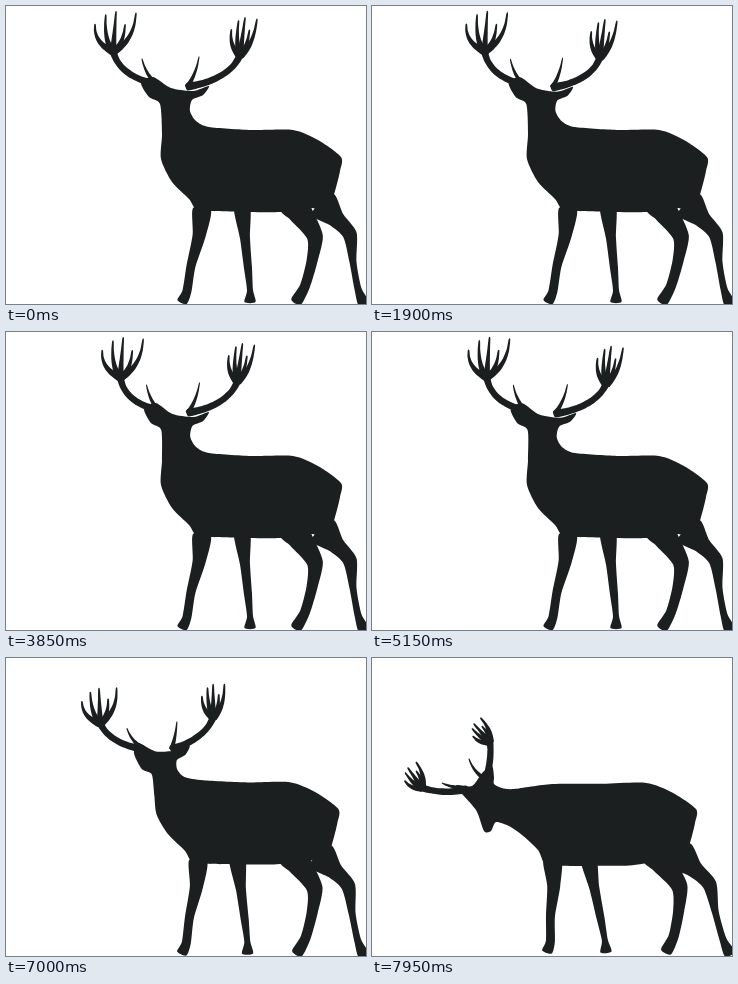
Recreate the animation shown at these times as an HTML page with a canvas. Size 360 by 298 pixels, loop 8 s.

```html
<!DOCTYPE html>
<html lang="en">
<head>
<meta charset="utf-8">
<title>Stag</title>
<style>
  html, body { margin: 0; width: 100%; height: 100%; overflow: hidden; background: #fff; }
  canvas { display: block; }
</style>
</head>
<body>
<canvas id="stage" width="360" height="298"></canvas>
<script>
const ctx = document.getElementById('stage').getContext('2d');
const LOOP = 8000, STEP = 50;
const LOWER_START = 6550, LOWER_END = 7950;

const clamp = v => Math.max(0, Math.min(1, v));
const mix = (a, b, k) => a + (b - a) * k;
const mixPoint = (a, b, k) => [mix(a[0], b[0], k), mix(a[1], b[1], k)];

// Points that move freely are [raised x, raised y, lowered x, lowered y].
const head = [
  [147, 71, 84, 128], [165, 82, 100, 128], [187, 85, 111, 114], [203, 80, 120, 108],
  [197, 89, 122, 119], [186, 94, 122, 126], [184, 105, 130, 130], [190, 115, 142, 131],
  [203, 121, 180, 126]
];
const throat = [
  [183, 193, 166, 192], [166, 176, 150, 177], [155, 153, 137, 168], [156, 128, 124, 164],
  [154, 98, 119, 173], [143, 91, 112, 173], [135, 77, 104, 152]
];
// The torso leans forward as a whole, most at the shoulder.
const torso = [
  [245, 124], [287, 124], [312, 134], [335, 151], [334, 165], [329, 185],
  [322, 204], [304, 202], [274, 206], [243, 206], [206, 205], [190, 203]
].map(([x, y]) => {
  const k = clamp((x - 190) / 140);
  return [x, y, x - mix(17, 11, k), y + mix(3, 0, k)];
});

// Joints are [x, y, width]; lean is the lowered pose's shift at the hip and the hoof.
const legs = [
  { lean: [-16, -1], joints: [[196, 203, 18], [193, 230, 13], [185, 260, 9], [181, 285, 9], [176, 296, 10]] },
  { lean: [-20, -10], joints: [[236, 200, 16], [239, 232, 10], [242, 262, 8], [244, 284, 6], [244, 296, 11]] },
  { lean: [-4, 4], joints: [[288, 196, 30], [295, 208, 24], [309, 231, 16], [306, 255, 11], [299, 280, 10], [290, 296, 11]] },
  { lean: [-9, 0], joints: [[316, 198, 30], [331, 214, 17], [344, 229, 14], [347, 256, 7], [352, 283, 7], [358, 298, 11]] }
];

// Reach is the vector from the crown to the middle tip, spread the crown's half width.
const antlers = [
  { base: [150, 78, 95, 131], bend: [115, 71, 74, 137], crown: [107, 46, 50, 130],
    reach: [3, -40, -14, -20], spread: [20, 10], brow: [136, 53, 70, 125] },
  { base: [181, 81, 114, 122], bend: [222, 74, 120, 100], crown: [234, 50, 118, 84],
    reach: [5, -38, -16, -18], spread: [12, 9], brow: [193, 51, 97, 101] }
];
const tineLengths = [0.65, 0.9, 1, 0.7, 1];

// Idle head turn: time, left antler shift, right antler shift, tilt.
const swayKeys = [
  [200, 0, 0, 0], [1900, 9, -10, 3], [2725, 0, 0, 0],
  [3850, 11, -5, 0], [5150, 11, -1, 4], [5700, 3, 4, 7]
];

function swayAt(t) {
  const next = swayKeys.findIndex(key => key[0] > t);
  const b = swayKeys.at(next), a = next > 0 ? swayKeys[next - 1] : b;
  const k = a === b ? 0 : (1 - Math.cos(Math.PI * (t - a[0]) / (b[0] - a[0]))) / 2;
  return [1, 2, 3].map(i => mix(a[i], b[i], k));
}

function fillSmooth(points) {
  const n = points.length, at = i => points[(i + n) % n];
  ctx.beginPath();
  ctx.moveTo(...points[0]);
  for (let i = 0; i < n; i++) {
    const [a, b, c, d] = [at(i - 1), at(i), at(i + 1), at(i + 2)];
    ctx.bezierCurveTo(
      b[0] + (c[0] - a[0]) / 8, b[1] + (c[1] - a[1]) / 8,
      c[0] - (d[0] - b[0]) / 8, c[1] - (d[1] - b[1]) / 8, c[0], c[1]);
  }
  ctx.fill();
}

// Fills a limb of varying width along a line of [x, y, width].
function fillLimb(joints) {
  const left = [], right = [], last = joints.length - 1;
  joints.forEach(([x, y, width], i) => {
    const a = joints[Math.max(0, i - 1)], b = joints[Math.min(last, i + 1)];
    const dx = b[0] - a[0], dy = b[1] - a[1], half = width / 2 / Math.hypot(dx, dy);
    left.push([x - dy * half, y + dx * half]);
    right.unshift([x + dy * half, y - dx * half]);
  });
  fillSmooth([...left, ...right]);
}

function fillHorn(from, bend, to, root, tip) {
  const joints = [];
  for (let k = 0; k <= 1; k += 0.2) {
    joints.push([...mixPoint(mixPoint(from, bend, k), mixPoint(bend, to, k), k), mix(root, tip, k)]);
  }
  fillLimb(joints);
}

function drawLeg({ lean, joints }, lowered) {
  fillLimb(joints.map(([x, y, width]) =>
    [x + lowered * mix(...lean, clamp((y - 200) / 95)), y - 2 * lowered, width]));
}

function drawAntler(antler, lowered, pose) {
  const [base, bend, crown, brow] = ['base', 'bend', 'crown', 'brow'].map(name => pose(antler[name]));
  const [rx, ry] = mixPoint(antler.reach, antler.reach.slice(2), lowered);
  const side = mix(...antler.spread, lowered) / Math.hypot(rx, ry);

  fillHorn(base, bend, crown, 7, 6);
  fillHorn(base, [mix(base[0], brow[0], 0.75), mix(base[1], brow[1], 0.4)], brow, 5, 1);
  // Tines fan out of the crown like a cup: first sideways, then along the reach.
  tineLengths.forEach((length, i) => {
    const u = (i / (tineLengths.length - 1) * 2 - 1) * side;
    const along = k => [crown[0] + rx * k - ry * u, crown[1] + ry * k + rx * u];
    fillHorn(crown, along(length * 0.3), along(length), 7, 1.5);
  });
}

function draw(t) {
  const lowered = clamp((t - LOWER_START) / (LOWER_END - LOWER_START)) ** 1.25;
  const [left, right, tilt] = swayAt(t);
  const pose = point => {
    const [x, y] = mixPoint(point, point.slice(2), lowered);
    const across = clamp((x - 88) / 162);
    const weight = clamp(1 - 2 * lowered) * clamp((125 - y) / 100);
    return [x + weight * mix(left, right, across), y + weight * tilt * mix(-0.25, 1, across)];
  };
  const lean = point => mixPoint(point, point.slice(2), lowered);

  ctx.fillStyle = '#fff';
  ctx.fillRect(0, 0, 360, 298);
  ctx.fillStyle = '#1b1f1f';
  fillSmooth([...head.map(pose), ...torso.map(lean), ...throat.map(pose)]);
  legs.forEach(leg => drawLeg(leg, lowered));
  antlers.forEach(antler => drawAntler(antler, lowered, pose));
}

function frame() {
  draw(Math.floor(performance.now() % LOOP / STEP) * STEP);
  requestAnimationFrame(frame);
}
frame();
</script>
</body>
</html>
```
